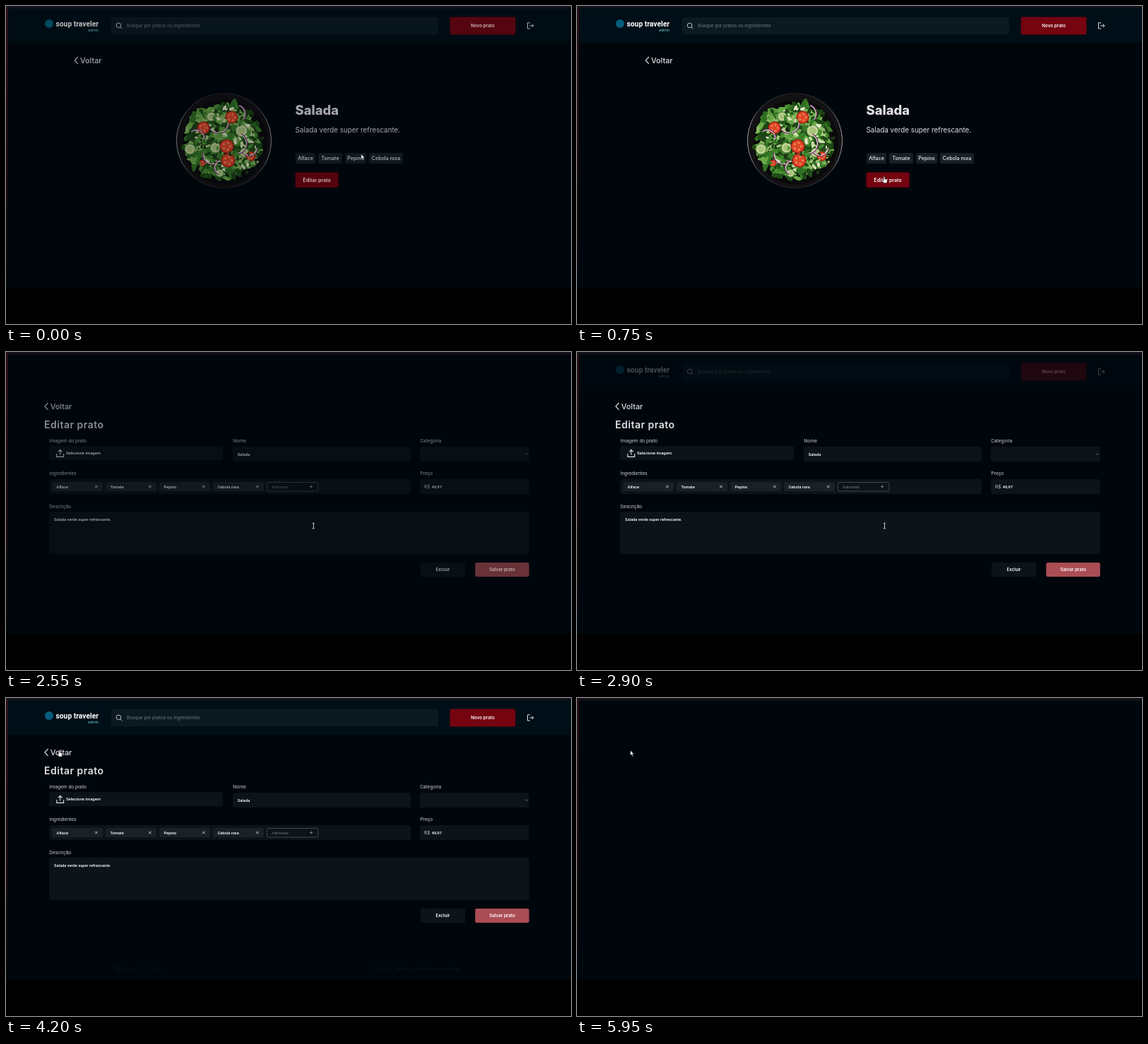
An HTML page with a canvas that plays this animation: 800x450 px, repeating every 6000 ms.

```html
<!DOCTYPE html>
<html lang="pt-BR">
<head>
<meta charset="utf-8">
<title>Editar prato</title>
<style>
html, body { margin: 0; width: 100%; height: 100%; overflow: hidden; background: #000; }
canvas { display: block; width: 800px; height: 450px; }
</style>
</head>
<body>
<canvas id="stage" width="800" height="450"></canvas>
<script>
const ctx = document.getElementById('stage').getContext('2d');
const LOOP = 6000, LEAVE_DISH = 2300, LEAVE_FORM = 5900;
const BRAND = 'soup traveler';
const INGREDIENTS = ['Alface', 'Tomate', 'Pepino', 'Cebola roxa'];
const INTER = 'Inter, "Open Sans", sans-serif';
const ROBOTO = 'Roboto, "Liberation Sans", sans-serif';
const BG = '#00070c', FIELD = '#0c141a', RED = '#750310', LIGHT = '#e1e1e6', GREY = '#c4c4cc';

const clamp = v => Math.max(0, Math.min(1, v));
const easeOut = u => 1 - (1 - u) ** 2;
const fade = (t, start, span) => easeOut(clamp((t - start) / span));
const inside = (p, x, y, w, h) => p.x >= x && p.x <= x + w && p.y >= y && p.y <= y + h;

function box(x, y, w, h, color, r = 2.5) {
  ctx.fillStyle = color;
  ctx.beginPath();
  ctx.roundRect(x, y, w, h, r);
  ctx.fill();
}

function text(str, x, y, size, color, weight = 400, family = ROBOTO, align = 'left', spacing = 0) {
  ctx.font = `${weight} ${size}px ${family}`;
  ctx.letterSpacing = spacing + 'px';
  ctx.textAlign = align;
  ctx.fillStyle = color;
  ctx.fillText(str, x, y);
}

function disc(c, x, y, r, color) {
  c.fillStyle = color;
  c.beginPath();
  c.arc(x, y, r, 0, 7);
  c.fill();
}

function stroke(d, color, width = 1) {
  ctx.strokeStyle = color;
  ctx.lineWidth = width;
  ctx.stroke(new Path2D(d));
}

function button(label, x, y, w, h, size, color) {
  box(x, y, w, h, color);
  text(label, x + w / 2, y + h / 2 + size * 0.36, size, '#fff', 600, INTER, 'center');
}

// Bowl of salad, drawn once from seeded blobs
function makeBowl() {
  const cv = document.createElement('canvas');
  cv.width = cv.height = 420;
  const c = cv.getContext('2d');
  c.scale(3, 3);
  c.translate(70, 70);
  let seed = 11;
  const rnd = () => (seed = (seed * 16807) % 2147483647) / 2147483647;
  const rim = c.createLinearGradient(-67, 10, 67, 10);
  rim.addColorStop(0, '#85858a');
  rim.addColorStop(0.12, '#343438');
  rim.addColorStop(0.5, '#1c1c1f');
  rim.addColorStop(0.88, '#3a3a3e');
  rim.addColorStop(1, '#85858a');
  disc(c, 0, 0, 67.5, rim);
  disc(c, 0, 0, 66.3, '#121113');
  disc(c, 1, 2, 60, '#0a0a0b');
  disc(c, 0, 1, 50, '#24461a');

  const greens = ['#1e4d16', '#2f7022', '#468c30', '#67a946', '#1b4413', '#397d28', '#8fba66', '#5a9a3c'];
  const pales = ['#d0dfae', '#a9cb84', '#e3e6c6', '#88b45f'];
  const leaf = (x, y, s, color) => {
    c.save();
    c.translate(x, y);
    c.rotate(rnd() * 6.3);
    c.fillStyle = color;
    c.beginPath();
    for (let i = 0; i < 9; i++) {
      const a = i * Math.PI * 2 / 9, r = s * (0.55 + rnd() * 0.6);
      c.lineTo(Math.cos(a) * r * 1.4, Math.sin(a) * r * 0.75);
    }
    c.fill();
    c.restore();
  };
  const scatter = (count, size, colors, reach = 55) => {
    for (let i = 0; i < count; i++) {
      const a = rnd() * 6.3, r = Math.sqrt(rnd()) * reach;
      leaf(Math.cos(a) * r, 1 + Math.sin(a) * r, size * (0.6 + rnd()), colors[Math.floor(rnd() * colors.length)]);
    }
  };
  scatter(230, 4.8, greens);
  scatter(70, 2.7, pales, 48);
  scatter(40, 2.2, ['#10270d', '#1a3a12']);

  for (const [x, y, r] of [[-48, 12, 8], [-12, 10, 8], [25, -14, 9], [-18, -34, 7], [29, 17, 7], [-6, 46, 6]]) {
    disc(c, x, y, r, '#4d8538');
    disc(c, x, y, r - 1.2, '#c3d498');
    disc(c, x, y, r * 0.55, '#a9c47b');
  }
  for (const [x, y, r] of [[11, -33, 9], [-29, -18, 9], [4, 8, 10], [6, 28, 10], [38, 22, 7], [-31, 32, 5]]) {
    disc(c, x, y, r, '#a52014');
    disc(c, x, y, r - 1.4, '#dd4528');
    for (let i = 0; i < 5; i++) {
      const a = i * 1.257;
      disc(c, x + Math.cos(a) * r * 0.5, y + Math.sin(a) * r * 0.5, r * 0.17, '#ef8050');
    }
  }
  for (const [x, y, r, a] of [[-39, -4, 12, 4], [18, -38, 13, 5], [-8, -25, 15, 0], [18, 4, 15, 5.2], [-16, 20, 14, 1], [36, 10, 12, 0], [-3, 38, 11, 2]]) {
    for (const [dr, color] of [[0, '#763264'], [-1.2, '#dccbd3']]) {
      c.strokeStyle = color;
      c.lineWidth = 1.2;
      c.beginPath();
      c.arc(x, y, r + dr, a, a + 2.5);
      c.stroke();
    }
  }
  scatter(45, 2.8, greens);
  return cv;
}
const bowl = makeBowl();

function backdrop() {
  ctx.globalAlpha = 1;
  ctx.fillStyle = '#000';
  ctx.fillRect(0, 0, 800, 450);
  ctx.fillStyle = BG;
  ctx.fillRect(0, 0, 800, 399);
}

function frameEdges() {
  ctx.globalAlpha = 1;
  ctx.fillStyle = '#14111a';
  ctx.fillRect(0, 0, 800, 3.5);
  const g = ctx.createLinearGradient(0, 0, 0, 385);
  g.addColorStop(0, '#5c1820');
  g.addColorStop(0.5, '#3c0c13');
  g.addColorStop(1, BG);
  ctx.fillStyle = '#020508';
  ctx.fillRect(0, 4, 1, 395);
  ctx.fillStyle = g;
  ctx.fillRect(1, 2, 1, 383);
}

function header(alpha) {
  ctx.globalAlpha = alpha;
  ctx.fillStyle = '#000e17';
  ctx.fillRect(2, 3, 798, 49);
  disc(ctx, 61, 25, 6, '#065e7c');
  text(BRAND, 70.5, 28.6, 10.3, '#fff', 700);
  text('admin', 116, 36, 5.4, '#70cfdc');
  box(149, 16, 463, 24, '#0b1920');
  stroke('M162.8 27.4a3.3 3.3 0 1 1-6.6 0a3.3 3.3 0 1 1 6.6 0M161.9 29.8l2.5 2.5', GREY);
  text('Busque por pratos ou ingredientes', 171, 30.4, 6.8, '#6b7379');
  button('Novo prato', 628.6, 15.6, 92.8, 24.8, 6.3, RED);
  stroke('M742 23.8h-3.5v8.2h3.5M741.2 27.9h5.6M744.5 25.5l2.4 2.4l-2.4 2.4', LIGHT);
}

function footer(alpha) {
  ctx.globalAlpha = alpha;
  ctx.fillStyle = '#000e17';
  ctx.fillRect(2, 366, 798, 33);
  disc(ctx, 159, 383, 6, '#414d53');
  text(BRAND, 167.5, 386.5, 10.3, '#414d53', 700);
  text('© 2023 - Todos os direitos reservados.', 518, 385.6, 7.45, GREY, 500);
}

function back(x) {
  stroke(`M${x + 4.8} 72l-4.6 4.9l4.6 4.9`, LIGHT, 1.2);
  text('Voltar', x + 8, 80.5, 10.8, LIGHT, 500, INTER);
}

function dishPage(alpha) {
  ctx.globalAlpha = alpha;
  back(97);
  ctx.drawImage(bowl, 238.5, 120.5, 140, 140);
  text('Salada', 409.5, 153.6, 18.4, LIGHT, 800, INTER);
  text('Salada verde super refrescante.', 409.5, 179, 9.85, LIGHT, 400, INTER);
  const edges = [[410, 28], [442, 34], [480, 30], [514, 48]];
  INGREDIENTS.forEach((name, i) => {
    const [x, w] = edges[i];
    box(x, 208, w, 15, '#172026', 2);
    text(name, x + w / 2, 218, 7.1, '#f0f0f4', 500, INTER, 'center');
  });
  button('Editar prato', 409.6, 235.6, 61, 21.2, 7, RED);
}

function formPage(alpha) {
  ctx.globalAlpha = alpha;
  back(54.7);
  text('Editar prato', 54, 108, 14, LIGHT, 600, INTER, 'left', 0.5);
  const fields = [
    ['Imagem do prato', 61, 133, 246, 20, 128],
    ['Nome', 321, 134, 252, 21, 128],
    ['Categoria', 586, 134, 154.5, 21, 128],
    ['Ingredientes', 61, 180, 512, 21, 174.3],
    ['Preço', 586, 180, 154.5, 21, 174.3],
    ['Descrição', 61, 226, 679.5, 60, 220.6]
  ];
  for (const [label, x, y, w, h, base] of fields) {
    box(x, y, w, h, FIELD, 3);
    text(label, x + 0.3, base, 6.95, GREY);
  }
  stroke('M71.8 144v4.4h9.8v-4.4M76.7 145.5v-7M73.8 141.3l2.9-2.9l2.9 2.9', LIGHT, 1.1);
  text('Selecione imagem', 85, 145.2, 5.95, '#fff', 500);
  text('Salada', 327.7, 146.7, 5.8, '#fff', 500);
  stroke('M735 143.5l2 2l2-2', '#7c7c8a', 0.9);
  text('R$', 592, 193, 6.7, GREY, 400, INTER);
  text('49,97', 602.7, 192.8, 5.8, '#fff', 500);
  text('Salada verde super refrescante.', 68, 238.7, 5.7, '#fff', 500);

  INGREDIENTS.forEach((name, i) => {
    const x = 65 + i * 76;
    box(x, 184, 72, 13, '#182127', 2);
    text(name, x + 6.6, 192.5, 5.7, '#fff', 500);
    stroke(`M${x + 61} 188.7l3.6 3.6m0-3.6l-3.6 3.6`, LIGHT, 0.8);
  });
  ctx.setLineDash([2, 1]);
  ctx.strokeStyle = '#6c737a';
  ctx.lineWidth = 0.8;
  ctx.beginPath();
  ctx.roundRect(369.5, 184.5, 72.5, 12.5, 2);
  ctx.stroke();
  ctx.setLineDash([]);
  text('Adicionar', 376, 192.5, 5.7, '#737a80');
  stroke('M430.2 190.5h4M432.2 188.5v4', '#9a9fa4', 0.8);

  button('Excluir', 587, 298, 63, 20, 6.1, FIELD);
  button('Salvar prato', 664.3, 298, 76.4, 20, 6.3, '#ab4d55');
}

const PATH = [
  [0, 503, 209.5], [400, 449, 204.5], [640, 435, 241.5], [850, 435, 241.5], [1150, 435, 246],
  [2950, 435.5, 246], [3270, 390, 190], [3850, 75.5, 74], [LOOP, 75.5, 74]
];

function pointer(t) {
  const i = PATH.findIndex(k => t < k[0]);
  const [t0, x0, y0] = PATH[i - 1], [t1, x1, y1] = PATH[i];
  const u = (t - t0) / (t1 - t0);
  return { x: x0 + (x1 - x0) * u, y: y0 + (y1 - y0) * u };
}

const shape = (d, color) => {
  const p = new Path2D(d);
  ctx.fillStyle = color;
  ctx.fill(p);
  ctx.strokeStyle = '#111';
  ctx.lineWidth = 0.5;
  ctx.stroke(p);
};

function cursor(p, kind) {
  ctx.globalAlpha = 1;
  ctx.save();
  ctx.translate(p.x, p.y);
  if (kind === 'beam') {
    stroke('M-1.6 -3.7h3.2M0 -3.7v7.4M-1.6 3.7h3.2', '#d8d8dc', 0.9);
  } else if (kind === 'hand') {
    shape('M-1 .3Q0-.7 .8 .3V3.3L3.6 4Q4.4 4.4 4.2 5.5L3.6 9H-.4L-3 5.7Q-2.8 4.5-1 5.8Z', '#fff');
  } else {
    shape('M0 0V7.3L1.7 5.8L2.9 8.4L4 7.9L2.8 5.4H5Z', '#fff');
  }
  ctx.restore();
}

function draw(t) {
  const p = pointer(t);
  const onDish = t < LEAVE_DISH, blank = t >= LEAVE_FORM;
  // Both pages share one reveal schedule
  const clock = onDish ? t + 3400 : t;
  const reveal = fade(clock, 2680, 1500);
  let kind = 'arrow';
  backdrop();
  if (!blank) {
    header(reveal);
    footer(fade(clock, 4150, 1700));
    if (onDish) {
      dishPage(reveal);
      if (inside(p, 410, 236, 60, 20)) kind = 'hand';
    } else {
      const shown = fade(t, 2380, 450);
      formPage(shown);
      if (inside(p, 54, 70, 40, 14)) kind = 'hand';
      else if (shown > 0 && (inside(p, 61, 226, 679, 60) || inside(p, 321, 134, 252, 21))) kind = 'beam';
    }
  }
  frameEdges();
  cursor(p, kind);
}

const start = performance.now();
function tick() {
  draw((performance.now() - start) % LOOP);
  requestAnimationFrame(tick);
}
tick();
</script>
</body>
</html>
```
